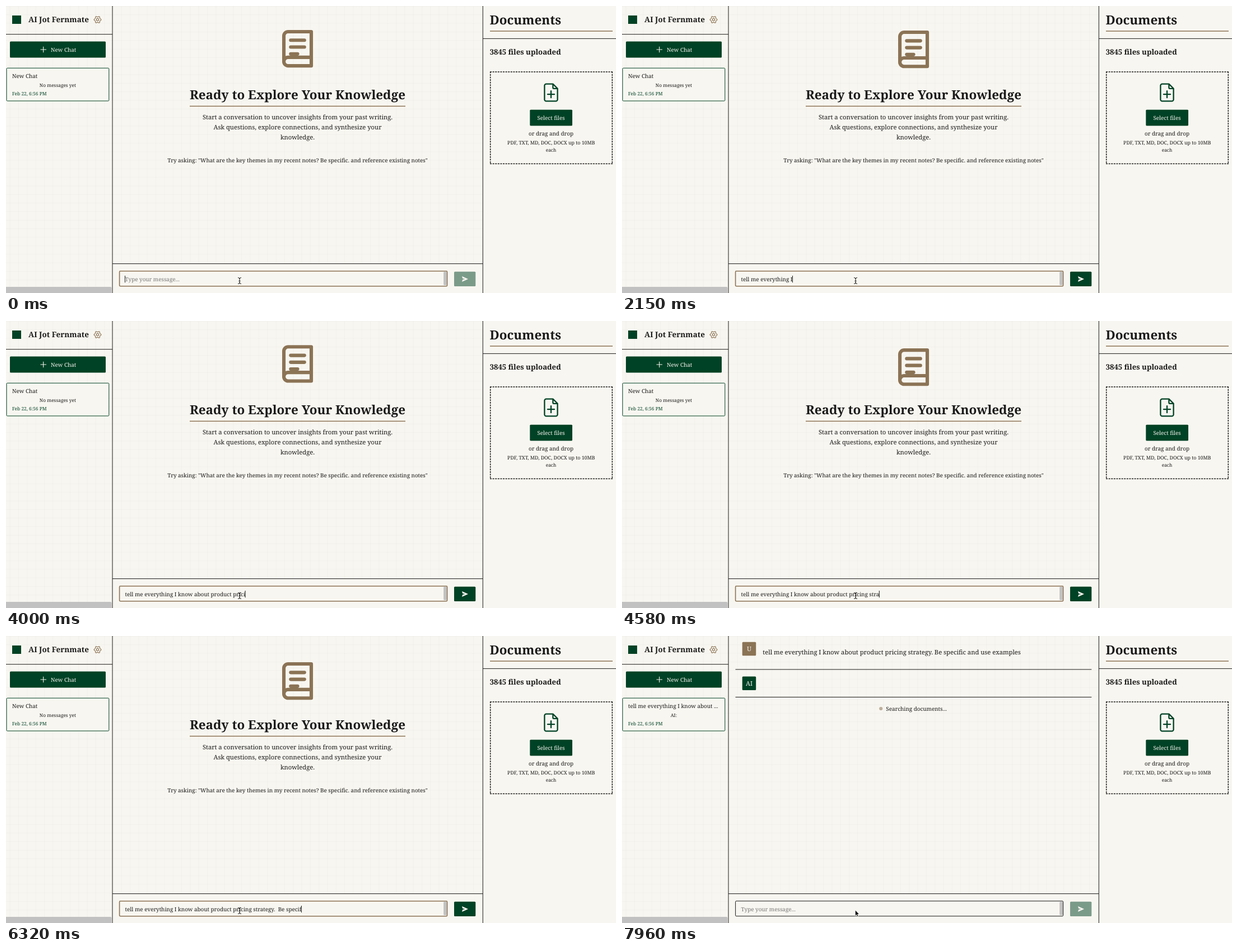
Recreate the animation shown at these times as an HTML page. Size 1089 by 514 pixels, loop 8000 ms.

```html
<!DOCTYPE html>
<html lang="en">
<head>
<meta charset="utf-8">
<title>Note assistant</title>
<style>
html, body { margin: 0; width: 100%; height: 100%; overflow: hidden; background: #f8f6f0; }
svg { display: block; width: 1089px; height: 514px; --ink: #1a1a1a; --green: #004225; --brown: #8b7355; }
text { font: 9.88px "Noto Serif", serif; fill: var(--ink); white-space: pre; text-rendering: geometricPrecision; }
.small { font-size: 8.4px; }
.large { font-size: 11.2px; }
.bold { font-size: 13.5px; font-weight: 700; }
.title { font-size: 22.45px; font-weight: 700; }
.mid { text-anchor: middle; }
.white { fill: #f8f6f0; }
.green { fill: var(--green); }
.brown { fill: var(--brown); }
.line { fill: none; stroke: var(--ink); }
.icon { fill: none; stroke-width: 2; stroke-linecap: round; stroke-linejoin: round; }
</style>
</head>
<body>
<svg viewBox="0 0 1089 514">
  <defs>
    <pattern id="grid" width="15.32" height="15.32" patternUnits="userSpaceOnUse" x="190.5">
      <path d="M0 .4H15.32M.4 0V15.32" stroke="#1a1a1a" stroke-opacity=".035" stroke-width=".8"/>
    </pattern>
  </defs>
  <rect width="1089" height="514" fill="#f8f6f0"/>
  <rect width="190" height="514" fill="url(#grid)"/>
  <rect x="190" width="661" height="461" fill="url(#grid)"/>
  <path class="line" d="M190 0V514M851.3 0V514M0 50.7H190M190 461.6H851M851 58.4H1089"/>

  <!-- sidebar -->
  <rect class="green" x="11" y="17" width="16" height="15"/>
  <text class="bold" x="40" y="29.3">AI Jot Fernmate</text>
  <g fill="none" stroke="#8b7355" stroke-width="1.15" stroke-linejoin="round" transform="translate(163.5 24.5)">
    <polygon id="gear"/><circle r="2.1"/>
  </g>
  <rect class="green" x="7" y="63.5" width="171" height="29" rx="1.5"/>
  <path d="M61.5 78H72M66.7 72.8V83.2" stroke="#f8f6f0" stroke-width="1.1"/>
  <text class="white" x="80" y="81.8">New Chat</text>
  <rect x="1" y="111.2" width="182.8" height="58.8" rx="1.5" fill="#f8f6f0" stroke="#004225"/>
  <text id="chatName" x="11" y="129.3"></text>
  <text id="chatNote" class="small mid" x="92.4" y="145.2"></text>
  <text class="small green" x="11" y="160.3">Feb 22, 6:56 PM</text>
  <path d="M0 503H186.5Q188.5 503 188.5 505V514H0Z" fill="#c1c1c1"/>

  <!-- welcome -->
  <g id="welcome">
    <g id="book" class="icon" stroke="#8b7355">
      <path d="M4 19.5A2.5 2.5 0 0 1 6.5 17H20M6.5 2H20V22H6.5A2.5 2.5 0 0 1 4 19.5V4.5A2.5 2.5 0 0 1 6.5 2ZM8 7H16M8 11H16M8 15H12"/>
    </g>
    <text class="title mid" x="520.5" y="166.7">Ready to Explore Your Knowledge</text>
    <rect class="brown" x="328" y="178.7" width="385" height="1.5"/>
    <text class="large mid" x="520.5" y="202.7">Start a conversation to uncover insights from your past writing.</text>
    <text class="large mid" x="520.5" y="221">Ask questions, explore connections, and synthesize your</text>
    <text class="large mid" x="520.5" y="239.4">knowledge.</text>
    <text class="mid" x="520.5" y="280.3">Try asking: "What are the key themes in my recent notes? Be specific. and reference existing notes"</text>
  </g>

  <!-- conversation -->
  <g id="conversation">
    <rect class="brown" x="214.7" y="10.7" width="24.5" height="24.5" rx="1.5"/>
    <text class="mid white large" x="227" y="27">U</text>
    <text class="large" x="251.3" y="33.4">tell me everything I know about product pricing strategy. Be specific and use examples</text>
    <path class="line" d="M202.5 59.9H838.3M202.5 109.5H838.3"/>
    <rect class="green" x="214.7" y="72.5" width="24.5" height="24.5" rx="1.5"/>
    <text class="mid white large" x="227" y="88.8">AI</text>
    <circle id="dot" class="brown" cx="462.2" cy="130" r="3.1"/>
    <text x="471.3" y="133.7">Searching documents...</text>
  </g>

  <!-- composer -->
  <rect id="field" x="202.6" y="474.7" width="585" height="27" rx="1.5" fill="#f8f6f0"/>
  <rect x="781.2" y="475.7" width="5.8" height="24.3" rx="1.5" fill="#c1c1c1"/>
  <text id="draft" x="212.5" y="492.7"></text>
  <rect id="caret" y="483" width="1" height="12.3" fill="#1a1a1a"/>
  <g id="send">
    <rect class="green" x="800" y="475.7" width="38.3" height="26.3" rx="1.5"/>
    <path class="white" d="M814 484 825 489 814 494 815.2 490.1 820 489 815.2 487.9Z"/>
  </g>

  <!-- documents -->
  <text class="title" x="863.5" y="32.6">Documents</text>
  <rect class="brown" x="864" y="44.2" width="219" height="1.5"/>
  <text class="bold" style="font-size:13.2px" x="863.7" y="86.7">3845 files uploaded</text>
  <path class="line" stroke-width="1.5" stroke-dasharray="3.06 1.535" d="M864 118H1083M864 282.5H1083M864.7 117.3V283.2M1082.3 117.3V283.2"/>
  <path class="icon" stroke="#004225" style="stroke-width:2.3" transform="translate(973 155)"
    d="M-6 3.2H6M0 -2.8V9.2M8.6 15.4H-8.6A3 3 0 0 1 -11.6 12.4V-12.4A3 3 0 0 1 -8.6 -15.4H3.4L11.6 -7.2V12.4A3 3 0 0 1 8.6 15.4ZM3.4 -15.4V-8.7A1.5 1.5 0 0 0 4.9 -7.2H11.6"/>
  <rect class="green" x="935.3" y="185.7" width="75.7" height="28.8" rx="1.5"/>
  <text class="mid white" x="973" y="203.8">Select files</text>
  <text class="mid" x="973" y="232.3">or drag and drop</text>
  <text class="mid" style="font-size:8.8px" x="973.3" y="248.3">PDF, TXT, MD, DOC, DOCX up to 10MB</text>
  <text class="small mid" x="973" y="260.5">each</text>

  <!-- pointers -->
  <path id="beam" class="line" d="M414 486.5Q417 486.5 417 488.5Q417 486.5 420 486.5M417 488V496M415.5 492.5H418.5M414 497.5Q417 497.5 417 495.5Q417 497.5 420 497.5"/>
  <path id="arrow" transform="translate(416.3 490.8)" stroke="#fff" stroke-width=".8" d="M0 0V10.5L2.4 8.3 4 12 5.8 11.2 4.2 7.6H7.4Z"/>
</svg>
<script>
const LOOP = 8000, STEP = 97, SENT = 7450;
const message = "tell me everything I know about product pricing strategy.  Be specific and use examples";
// [time in ms, characters typed]
const typing = [[600, 0], [890, 2], [1760, 15], [2150, 20], [2630, 26], [3320, 38], [3510, 40], [4390, 49],
  [4580, 52], [4780, 53], [4930, 53], [5550, 60], [5900, 60], [6710, 75], [6990, 80], [7360, 87]];
const $ = id => document.getElementById(id);
const show = (id, on) => $(id).style.display = on ? "" : "none";

$("gear").setAttribute("points", Array.from({ length: 24 }, (_, i) => {
  const angle = (i - .5) * Math.PI / 12, r = i % 4 < 2 ? 6.3 : 4.9;
  return [r * Math.cos(angle), r * Math.sin(angle)];
}).join(" "));

function typedCount(t) {
  const next = typing.findIndex(([time]) => time > t);
  if (next === 0) return 0;
  if (next < 0) return message.length;
  const [t0, n0] = typing[next - 1], [t1, n1] = typing[next];
  return Math.floor(n0 + (n1 - n0) * (t - t0) / (t1 - t0));
}

function draw(now) {
  const t = Math.floor(now % LOOP / STEP) * STEP + 30;
  const sent = t >= SENT;
  const typed = sent ? "" : message.slice(0, typedCount(t));

  show("welcome", !sent);
  show("conversation", sent);
  show("beam", !sent);
  show("arrow", sent);
  show("caret", !sent);

  const drop = (1 - Math.cos((t + 50) / 1950 * 2 * Math.PI)) / 2;
  $("book").setAttribute("transform", `translate(483.8 ${39.7 + 7.3 * drop}) scale(3.06)`);
  $("dot").style.opacity = .75 + .25 * Math.cos((t - SENT) / 1330 * 2 * Math.PI);

  $("chatName").textContent = sent ? "tell me everything I know about ..." : "New Chat";
  $("chatNote").textContent = sent ? "AI:" : "No messages yet";
  $("draft").textContent = typed || "Type your message...";
  $("draft").style.fill = typed ? "" : "#777";
  $("caret").setAttribute("x", 212 + (typed ? $("draft").getComputedTextLength() : 0));
  $("field").style.stroke = sent ? "var(--ink)" : "var(--brown)";
  $("field").style.strokeWidth = sent ? 1 : 1.6;
  $("send").style.opacity = typed ? 1 : .5;
}

function tick() {
  draw(performance.now());
  requestAnimationFrame(tick);
}
tick();
</script>
</body>
</html>
```
